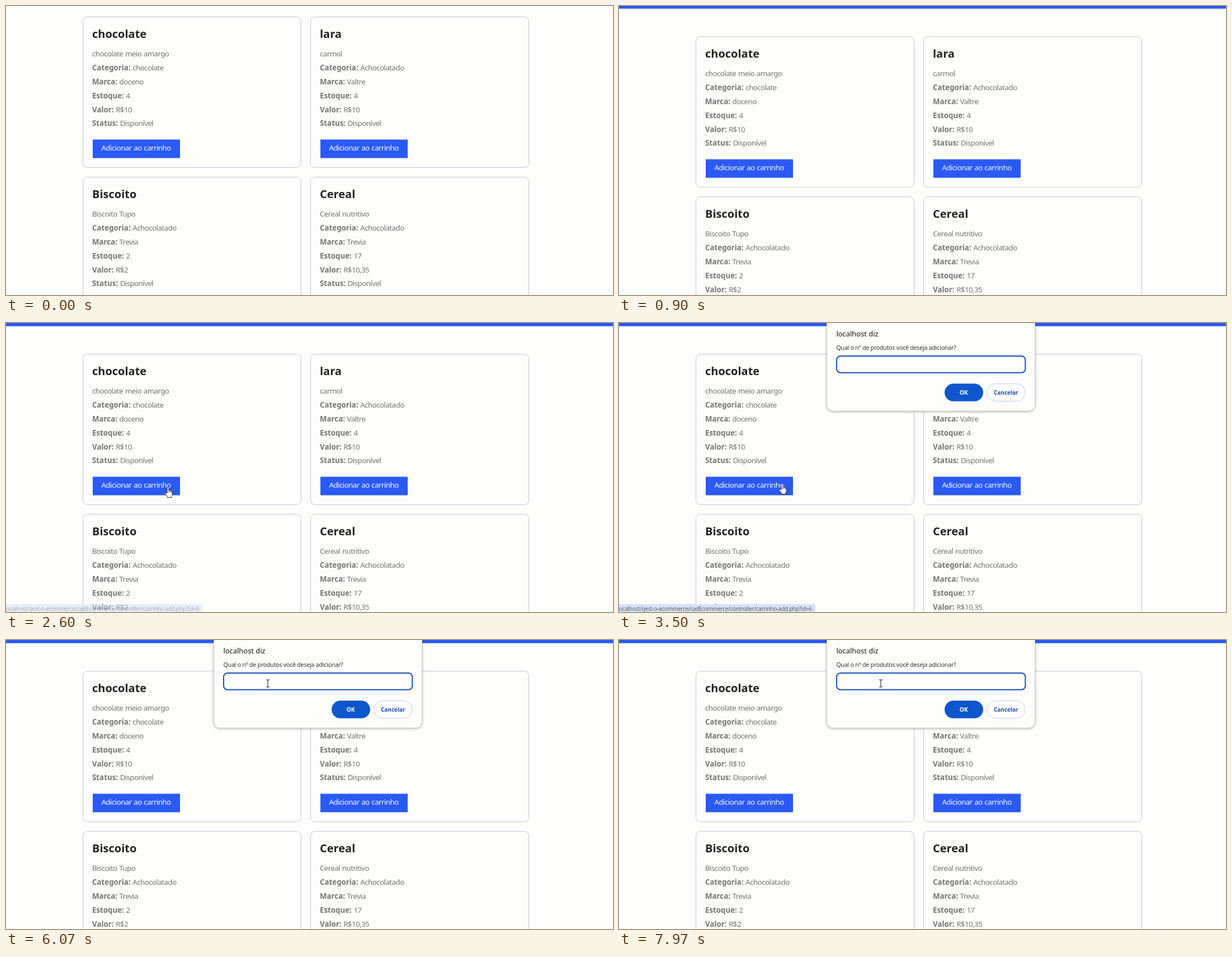
Animation, 1085 px wide and 516 px high, one loop 8 s. Source, as an HTML page:

```html
<!DOCTYPE html>
<html lang="pt-BR">
<head>
<meta charset="utf-8">
<title>Loja</title>
<style>
  html, body { margin: 0; width: 100%; height: 100%; overflow: hidden; background: #fdfdfc; }
  svg { display: block; width: 1085px; height: 516px; font-family: "Noto Sans", "Open Sans", sans-serif; }

  .card { fill: #fdfdfc; stroke: #c2c2cc; }
  .title { font-size: 20px; font-weight: 700; fill: #222; }
  .line { font-size: 13.3px; letter-spacing: -.55px; word-spacing: .7px; fill: #747474; }
  .line .key { font-weight: 700; letter-spacing: 0; }
  .blue { fill: #2a59f4; }
  .line.label { fill: #fff; }

  .panel { fill: #fdfdfc; stroke: #d2d2cf; filter: drop-shadow(0 1px 2px rgba(0, 0, 0, .3)); }
  .heading { font-size: 12.9px; font-weight: 500; fill: #161616; }
  .question { font-size: 10.6px; letter-spacing: -.22px; fill: #333; }
  .field { fill: #fdfdfc; stroke: #1553b4; stroke-width: 2; }
  .action { font-size: 10.2px; font-weight: 600; letter-spacing: -.12px; text-anchor: middle; }
  .url { font-size: 10px; letter-spacing: -.3px; fill: #596069; }

  .page, .dialog, .status, .cursor { animation: 8s linear infinite; }
  .pointer { animation: 8s step-end infinite; }
  .page { animation-name: scroll; }
  .dialog { animation-name: dialog; }
  .status { animation-name: status; }
  .cursor { animation-name: travel; }
  .arrow { animation-name: arrow; }
  .hand { animation-name: hand; }
  .beam { animation-name: beam; }

  @keyframes scroll {
    0% { transform: translateY(-36px); animation-timing-function: ease-out; }
    1.2% { transform: translateY(-38px); }
    8.625% { transform: translateY(-38px); animation-timing-function: ease-in-out; }
    11.575%, 100% { transform: none; }
  }
  @keyframes dialog {
    0%, 37% { opacity: 0; }
    38%, 100% { opacity: 1; }
  }
  @keyframes status {
    0%, 31% { opacity: 0; }
    34%, 53.5% { opacity: 1; }
    56%, 100% { opacity: 0; }
  }
  @keyframes travel {
    0%, 26.6% { transform: translate(302px, 526px); animation-timing-function: ease-out; }
    30.4%, 34% { transform: translate(289.5px, 293px); animation-timing-function: ease-in-out; }
    37%, 48.75% { transform: translate(291.5px, 287px); animation-timing-function: ease-in-out; }
    56%, 61.5% { transform: translate(469px, 78.5px); }
    62%, 100% { transform: translate(468px, 77.5px); }
  }
  @keyframes arrow {
    0% { opacity: 0; }
    26.6% { opacity: 1; }
    29.3% { opacity: 0; }
    49.6% { opacity: 1; }
    54.7%, 100% { opacity: 0; }
  }
  @keyframes hand {
    0% { opacity: 0; }
    29.3% { opacity: 1; }
    49.6%, 100% { opacity: 0; }
  }
  @keyframes beam {
    0% { opacity: 0; }
    54.7%, 100% { opacity: 1; }
  }
</style>
</head>
<body>
<svg viewBox="0 0 1085 516">
  <g class="page">
    <rect class="blue" y="-94.3" width="1085" height="100"/>
    <g id="cards"></g>
  </g>

  <g class="status">
    <path d="M0 502H347Q351 502 351 506V516H0Z" fill="#d5e3fa"/>
    <text class="url" x="0" y="513.5">ocalhost/gest-o-ecommerce/cadEcommerce/controller/carrinho-add.php?id=6</text>
  </g>

  <g class="dialog">
    <rect class="panel" x="371.5" y="-20" width="372" height="177" rx="11"/>
    <text class="heading" x="388.5" y="24">localhost diz</text>
    <text class="question" x="388.5" y="48">Qual o nº de produtos você deseja adicionar?</text>
    <rect class="field" x="389" y="59" width="337.3" height="29.8" rx="7"/>
    <rect x="582" y="108.3" width="69" height="31.5" rx="15.7" fill="#0f56cc"/>
    <text class="action" x="616" y="128.3" fill="#fff">OK</text>
    <rect x="657.5" y="108.5" width="68.5" height="31" rx="15.5" fill="#fdfdfc" stroke="#c0cdee"/>
    <text class="action" x="691.7" y="128.3" fill="#2454b4">Cancelar</text>
  </g>

  <g class="cursor">
    <g class="pointer arrow">
      <path d="M0 0V15L3.5 11.8L6 17L8.2 16L5.8 11H10.6Z" fill="#fff" stroke="#222"/>
    </g>
    <g class="pointer hand">
      <path d="M-1.4 11V1.4Q-1.4 0 0 0T1.4 1.4V6Q3.4 5 4 6.6Q5.8 5.8 6.3 7.4Q8 7 8 9V13Q8 15 6.4 16.2V18.5H-1.2V16.6L-5 11.6Q-5.4 9.6 -3.6 9.6Z"
            fill="#fff" stroke="#222" stroke-linejoin="round"/>
      <path d="M1.4 6V10M4 7V10M6.3 8V10.4" fill="none" stroke="#222" stroke-width=".8"/>
    </g>
    <g class="pointer beam">
      <path d="M-3 -6.5H-1L0 -5.5L1 -6.5H3M0 -5.5V5.5M-3 6.5H-1L0 5.5L1 6.5H3" fill="none" stroke="#222" stroke-width="1.1"/>
    </g>
  </g>
</svg>

<script>
  const products = [
    ["chocolate", "chocolate meio amargo", "chocolate", "doceno", "4", "10"],
    ["lara", "carmol", "Achocolatado", "Valtre", "4", "10"],
    ["Biscoito", "Biscoito Tupo", "Achocolatado", "Trevia", "2", "2"],
    ["Cereal", "Cereal nutritivo", "Achocolatado", "Trevia", "17", "10,35"]
  ];

  const row = (key, value, i) =>
    `<text class="line" x="17" y="${71.5 + 24.8 * i}">` +
    (key ? `<tspan class="key">${key}:</tspan> ` : "") + `${value}</text>`;

  const card = ([title, info, category, brand, stock, price], i) => {
    const rows = [
      ["", info], ["Categoria", category], ["Marca", brand],
      ["Estoque", stock], ["Valor", "R$" + price], ["Status", "Disponível"]
    ];
    return `<g transform="translate(${137 + 407 * (i % 2)} ${55 + 286 * (i >> 1)})">
      <rect class="card" x=".5" y=".5" width="390" height="269" rx="8"/>
      <text class="title" x="17" y="38">${title}</text>
      ${rows.map(([key, value], n) => row(key, value, n)).join("")}
      <rect class="blue" x="18" y="219.5" width="156" height="33"/>
      <text class="line label" x="33.5" y="239.3">Adicionar ao carrinho</text>
    </g>`;
  };

  document.getElementById("cards").innerHTML = products.map(card).join("");
</script>
</body>
</html>
```
